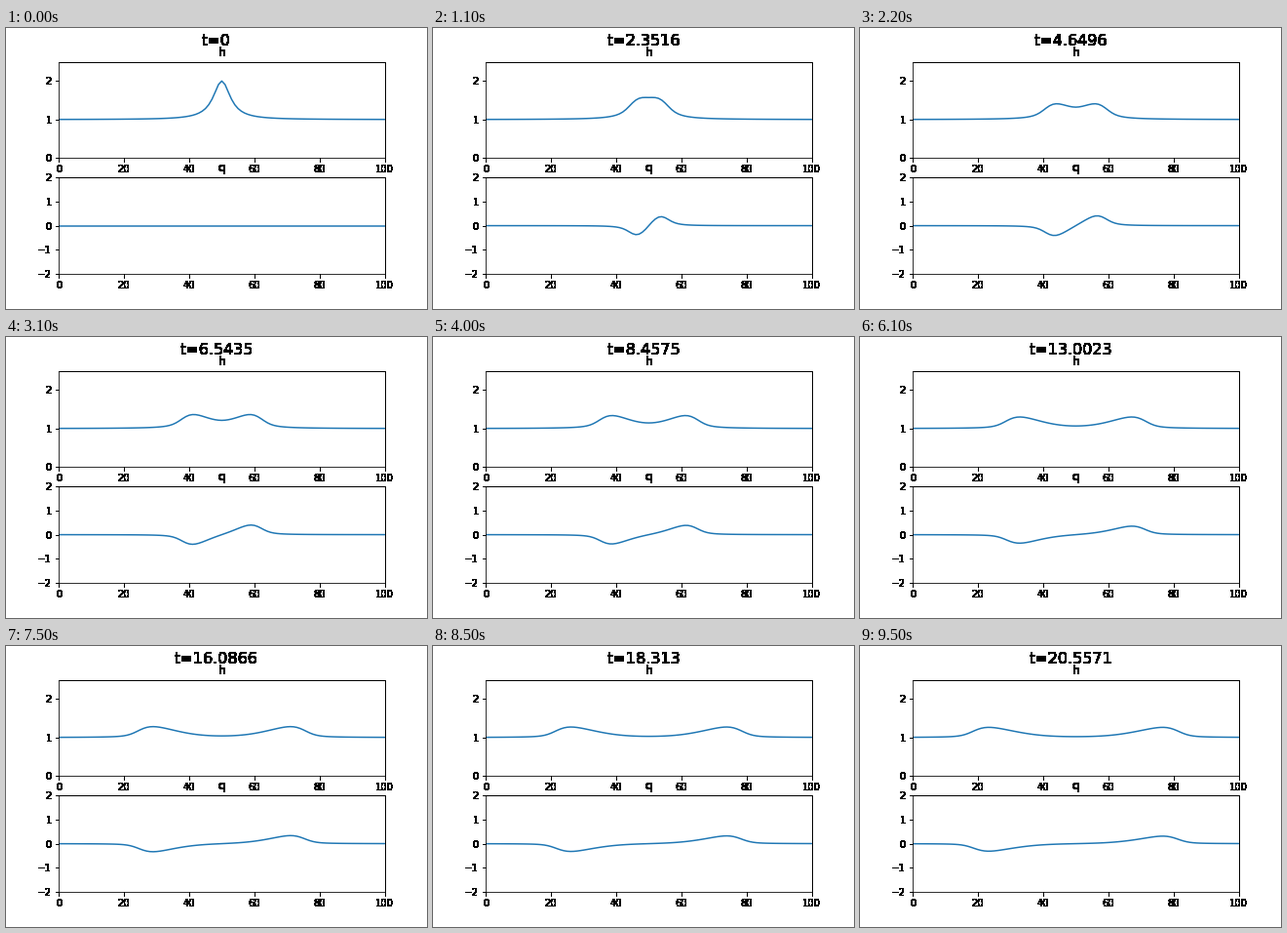
Recreate the animation shown at these times as a matplotlib script. Size 432 by 288 pixels, loop 9600 ms.

```python
import matplotlib.pyplot as plt
import numpy as np
from matplotlib.animation import FuncAnimation

FRAMES, INTERVAL = 96, 100
CELLS, LENGTH = 100, 100.0
COURANT = 0.309

x = np.linspace(0, LENGTH, CELLS + 1)
dx = x[1] - x[0]


def flux(state):
    h, q = state
    return np.array([q, q**2 / h + h**2 / 2])


def wave_speed(state):
    h, q = state
    return np.abs(q / h) + np.sqrt(h)


def step(state, dt):
    """One Rusanov finite-volume step with open ends."""
    padded = np.pad(state, ((0, 0), (1, 1)), mode="edge")
    left, right = padded[:, :-1], padded[:, 1:]
    speed = np.maximum(wave_speed(left), wave_speed(right))
    face = (flux(left) + flux(right) - speed * (right - left)) / 2
    return state - dt / dx * np.diff(face)


def simulate():
    t = 0
    state = np.array([1 + 1 / (1 + (x - 50) ** 2 / 10), 0 * x])
    history = [(t, state)]
    for _ in range(FRAMES - 1):
        dt = COURANT * dx / wave_speed(state).max()
        state = step(state, dt)
        t += dt
        history.append((t, state))
    return history


def solid_ink(image, dpi):
    """Turn every touched pixel fully black, without soft edges."""
    image[..., :3] = 0
    image[..., 3] = image[..., 3] > 0
    return image, 0, 0


def style(ax, title, ylim, yticks):
    ax.set(xlim=(0, LENGTH), ylim=ylim,
           xticks=range(0, 101, 20), yticks=yticks)
    ax.set_title(title).set_agg_filter(solid_ink)
    for axis in (ax.xaxis, ax.yaxis):
        for part in [*axis.get_ticklabels(), *axis.get_ticklines()]:
            part.set_agg_filter(solid_ink)
    for side in ("top", "right"):
        ax.spines[side].set_linewidth(1)


history = simulate()

fig, (ax_h, ax_q) = plt.subplots(2, figsize=(6, 4), dpi=72)
fig.subplots_adjust(left=0.125, right=0.9, bottom=0.125, top=0.88, hspace=0.2)
style(ax_h, "h", (0, 2.5), [0, 1, 2])
style(ax_q, "q", (-2, 2), [-2, -1, 0, 1, 2])
lines = [ax.plot(x, 0 * x, color="C0", lw=1.5)[0] for ax in (ax_h, ax_q)]
clock = fig.suptitle("", fontsize=16)
clock.set_agg_filter(solid_ink)


def update(frame):
    t, state = history[frame]
    for line, values in zip(lines, state):
        line.set_ydata(values)
    clock.set_text(f"t={round(t, 4)}")
    return [*lines, clock]


anim = FuncAnimation(fig, update, frames=FRAMES, interval=INTERVAL,
                     repeat=True, repeat_delay=0)
plt.show()
```
